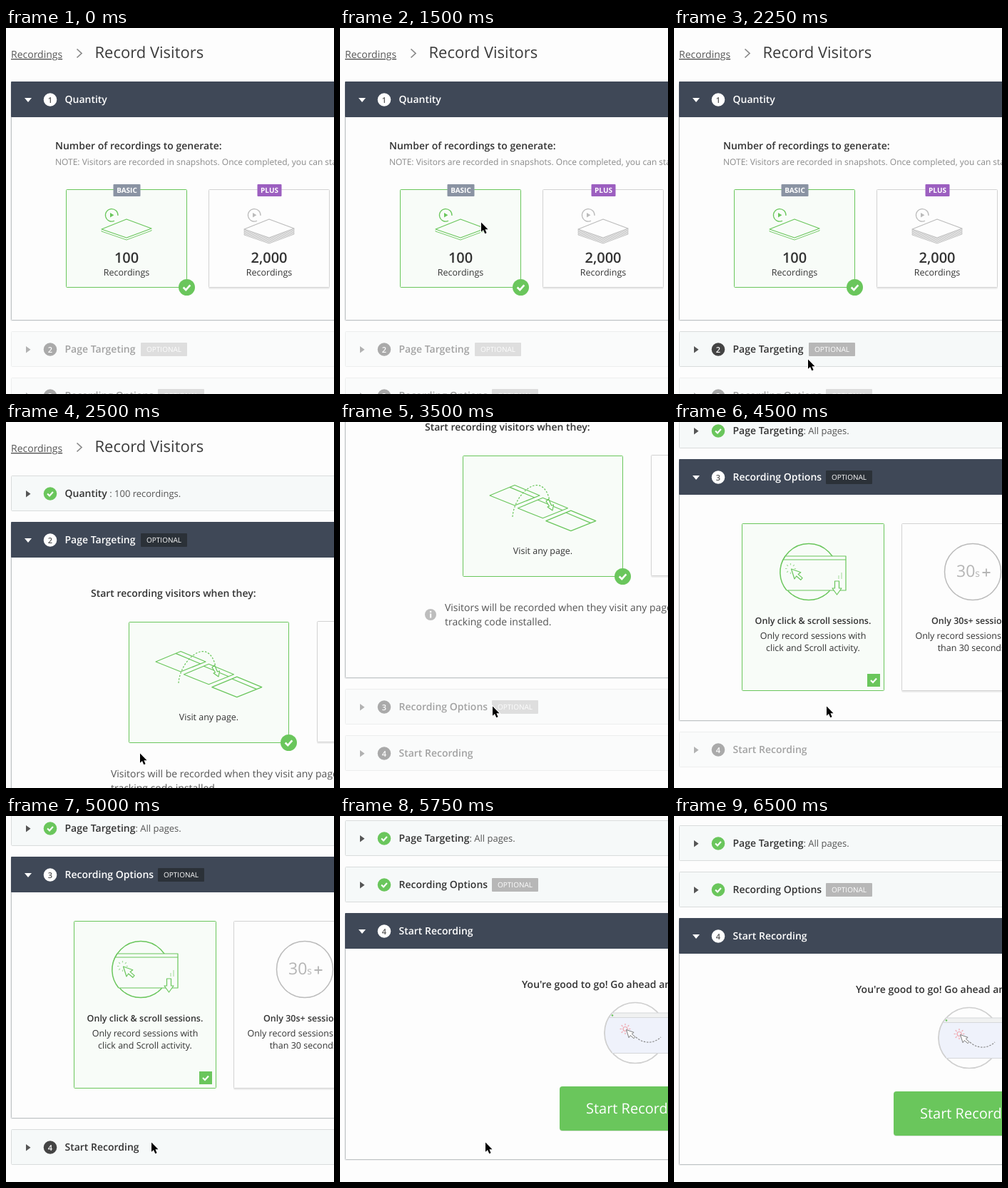
Recreate the animation shown at these times as an HTML page. Size 460 px wide and 513 px high, loop 7250 ms.

```html
<!DOCTYPE html>
<html lang="en">
<head>
<meta charset="utf-8">
<title>Record visitors</title>
<style>
  html, body { margin: 0; width: 100%; height: 100%; overflow: hidden; background: #fdfdfd; }
  svg { display: block; width: 460px; height: 513px; overflow: hidden; }
  text { font: 14px "Open Sans", "Noto Sans", sans-serif; fill: #555; text-rendering: geometricPrecision; }
  .bold { font-weight: 600; fill: #333; }
  .white { fill: #fff; }
  .small { font-size: 12.5px; fill: #333; }
  .mid { text-anchor: middle; }
  .tag { font-size: 10px; fill: #fff; }
  .num { font-size: 11px; font-weight: 600; text-anchor: middle; }
  .note { font-size: 13px; font-weight: 400; fill: #555; }
  .line { fill: none; stroke: currentColor; stroke-width: 1.2; stroke-linejoin: round; }
  .fill { fill: #fafdfa; }
  .green { color: #6ac65c; }
  .grey { color: #bbb; }

  .scene, .todo, #info, #cursor { animation: 7250ms step-end infinite; }
  .todo { opacity: .45; }
  #a { animation-name: a; }
  #b { animation-name: b; }
  #c { animation-name: c; }
  #d { animation-name: d; }
  #info { animation-name: info; }
  #cursor { animation-name: cursor; }
  .hover2 { animation-name: hover2; }
  .hover3 { animation-name: hover3; }
  .hover4 { animation-name: hover4; }

  @keyframes a { 0% { opacity: 1 } 34.482%, 100% { opacity: 0 } }
  @keyframes b {
    0% { opacity: 0; transform: none }
    34.482% { opacity: 1; transform: none }
    48.275% { opacity: 1; transform: translateY(-233px) }
    51.724% { opacity: 1; transform: translateY(-231px) }
    58.620%, 100% { opacity: 0; transform: none }
  }
  @keyframes c {
    0% { opacity: 0; transform: none }
    58.620% { opacity: 1; transform: translateY(5px) }
    62.068% { opacity: 1; transform: none }
    65.517% { opacity: 1; transform: translateY(4px) }
    68.965% { opacity: 1; transform: translateY(5px) }
    72.413%, 100% { opacity: 0; transform: none }
  }
  @keyframes d {
    0% { opacity: 0; transform: none }
    72.413% { opacity: 1; transform: translateY(7px) }
    79.310% { opacity: 1; transform: none }
    82.758% { opacity: 1; transform: translateY(6px) }
    86.206%, 100% { opacity: 1; transform: translateY(7px) }
  }
  @keyframes info { 0% { opacity: 0 } 37.931%, 100% { opacity: 1 } }
  @keyframes hover2 { 0% { opacity: .45 } 31.034%, 100% { opacity: 1 } }
  @keyframes hover3 { 0% { opacity: .45 } 55.172%, 100% { opacity: 1 } }
  @keyframes hover4 { 0% { opacity: .45 } 68.965%, 100% { opacity: 1 } }
  @keyframes cursor {
    0% { opacity: 0; transform: translate(304px, 184px) }
    10.344% { opacity: 1; transform: translate(304px, 184px) }
    13.793% { opacity: 1; transform: translate(240px, 220px) }
    17.241% { opacity: 1; transform: translate(198px, 267px) }
    20.689% { opacity: 1; transform: translate(196px, 271px) }
    27.586% { opacity: 1; transform: translate(191px, 437px) }
    31.034% { opacity: 1; transform: translate(186px, 463px) }
    41.379% { opacity: 1; transform: translate(208px, 401px) }
    44.827% { opacity: 1; transform: translate(212px, 397px) }
    65.517% { opacity: 1; transform: translate(209px, 425px) }
    68.965% { opacity: 1; transform: translate(202px, 456px) }
    82.758% { opacity: 1; transform: translate(212px, 455px) }
    86.206% { opacity: 1; transform: translate(230px, 451px) }
    89.655%, 100% { opacity: 0; transform: translate(230px, 451px) }
  }
</style>
</head>
<body>
<svg id="stage" viewBox="0 0 460 513"></svg>
<script>
const GREEN = '#6ac65c';

const text = (x, y, str, cls = '') => `<text x="${x}" y="${y}" class="${cls}">${str}</text>`;
const box = (x, y, w, h, fill, r = 0) =>
  `<rect x="${x}" y="${y}" width="${w}" height="${h}" rx="${r}" fill="${fill}"/>`;
const frame = (x, y, w, h, fill, stroke, r = 0) =>
  `<rect x="${x + .5}" y="${y + .5}" width="${w - 1}" height="${h - 1}" rx="${r}" fill="${fill}" stroke="${stroke}"/>`;
const dot = (x, y, r, fill) => `<circle cx="${x}" cy="${y}" r="${r}" fill="${fill}"/>`;
const line = (d, extra = '') => `<path class="line" d="${d}" ${extra}/>`;
const group = (cls, ...parts) => `<g class="${cls}">${parts.join('')}</g>`;
const scene = (id, ...parts) => `<g id="${id}" class="scene">${parts.join('')}</g>`;

const tick = (x, y, s) =>
  `<path d="M${x - 4 * s} ${y}l${3 * s} ${3 * s}l${5 * s} ${-5.6 * s}" fill="none" stroke="#fff" stroke-width="${2.2 * s}"/>`;
const check = (x, y, r) => dot(x, y, r, GREEN) + tick(x, y, r / 9.5);
const optional = (x, y, fill) => box(x, y + 16, 65, 19, fill, 1) + text(x + 8, y + 29, 'OPTIONAL', 'tag');

// Closed step: 50px high bar
const bar = (y, mark, title, badgeX) =>
  frame(7, y, 470, 50, '#f6f9f9', '#d9dcdc', 1) +
  `<path d="M28 ${y + 21}l6.5 4.8l-6.5 4.8z" fill="#555"/>` + mark +
  text(82.5, y + 30, title, 'bold') + (badgeX ? optional(badgeX, y, '#b7b7b7') : '');
const done = (y, title, badgeX) => bar(y, check(62, y + 25.5, 9.3), title, badgeX);
const todo = (y, n, title, badgeX, hover = '') => group('todo ' + hover,
  bar(y, dot(62, y + 25.5, 9.3, '#444') + text(62, y + 29.5, n, 'num white'), title, badgeX));

// Open step: dark header over a bordered panel
const panel = (y, end, n, title, badgeX) =>
  box(6, y + 3, 470, end - y - 1, '#eeeff0', 2) +
  frame(7, y, 470, end - y + 1, '#fdfdfd', '#bfc3c5', 1) +
  box(7, y, 470, 50, '#3f4857', 1) +
  `<path d="M26 ${y + 23}h10l-5 6z" fill="#fff"/>` +
  dot(62, y + 25.5, 9.3, '#fff') + text(62, y + 29.5, n, 'num') +
  text(82.5, y + 30, title, 'bold white') + (badgeX ? optional(badgeX, y, '#2b3138') : '');

const card = (x, y, w, h, on) =>
  (on ? '' : box(x, y + 2, w, h, '#ececec', 2)) +
  frame(x, y, w, h, on ? '#f8fcf8' : '#fdfdfd', on ? GREEN : '#d2d2d2', 1);

const crumbs = text(7, 42, 'Recordings').replace('<text', '<text text-decoration="underline"') +
  '<path d="M99.5 29.5l6.5 6l-6.5 6" fill="none" stroke="#888" stroke-width="1.7"/>' +
  `<text x="124.5" y="42" style="font-size:22px;fill:#3a3a3a">Record Visitors</text>`;

// Stack of sheets with a play button
const stack = (x, layers, color) => {
  let out = line(`M${x - 35} 282l35 -14l35 13l-35 13z`);
  for (let i = 1; i <= layers; i++) {
    const y = 282 + i * (layers > 1 ? 1.6 : 3);
    out += line(`M${x - 35} ${y - 1}v1l35 12l35 -13v-1`, 'style="stroke-width:.9"');
  }
  return group(color, out,
    line(`M${x - 17} 270.3a8.8 8.8 0 1 1 5 -7.3`),
    `<path d="M${x - 23} 259v6.6l5.4 -3.3z" fill="currentColor"/>`);
};
const plan = (x, layers, color, on, badge, badgeW, badgeFill, count) =>
  card(x, 226, 170, 138, on) +
  box(x + 85.5 - badgeW / 2, 219, badgeW, 17, badgeFill, 1) +
  `<text x="${x + 85.5}" y="231" class="tag mid" font-weight="700" style="font-weight:700">${badge}</text>` +
  stack(x + 85, layers, color) +
  `<text x="${x + 85}" y="328.5" class="bold mid" style="font-size:20px">${count}</text>` +
  text(x + 85, 347, 'Recordings', 'small mid');

const pages = () => {
  let out = '';
  for (let i = 0; i < 3; i++) {
    const x = 210 + i * 39.4, y = 336 + i * 17.8;
    out += line(`M${x} ${y}l35 -14.5l35 14.5l-35 14z M${x + 28} ${y - 11.6}l35 14.6`);
  }
  return group('green', out,
    line('M242 366C244 333 284 298 294 343', 'stroke-dasharray="2.5 2"'),
    line('M289 344l3.5 -3l4 9l3 -1l-1.5 8l-7 -5l2.5 -1z', 'style="fill:#f8fcf8"'));
};

const pointer = 'l4.5 14l2.7 -4l6 5.3l2.4 -2.7l-6 -5.2l3.7 -2.6z';
const rays = (x, y) => {
  let d = '';
  for (let i = 0; i < 8; i++) {
    const c = Math.cos(i * Math.PI / 4), s = Math.sin(i * Math.PI / 4);
    d += `M${x + 5 * c} ${y + 5 * s}L${x + 7.5 * c} ${y + 7.5 * s}`;
  }
  return d;
};

const clicks = group('green',
  '<circle class="line" cx="189" cy="210" r="39.5" style="stroke-width:1.5"/>',
  '<path d="M156 188H241V236H158A39.5 39.5 0 0 1 156 188z" fill="#f8fcf8"/>',
  line('M158 236A39.5 39.5 0 0 1 156 188', 'style="stroke-width:1.5"'),
  line('M156 188H241V236H158M153 193H241'),
  line(rays(163.5, 205.5), 'opacity=".6"'),
  line('M164.500 206' + pointer, 'style="fill:#f8fcf8"'),
  line('M231 220v-5M235 220v-9', 'opacity=".5"'),
  line('M225.500 223h6v10h3.500l-6.500 9l-6.500 -9h3.500z', 'style="fill:#f8fcf8"'));

const replay = group('grey',
  '<circle class="line" cx="414" cy="304" r="42.5" style="stroke:#cfcfcf;stroke-width:1.7"/>',
  '<path d="M381.500 276H470V332H381.500A43 43 0 0 1 381.500 276z" fill="#eff2fb"/>',
  box(381, 276, 90, 6, '#f0f1f1'),
  line('M382 276H470M378 282.500H470M382 332.500H470', 'style="stroke:#d5d7da"'),
  line('M381.500 332A42.500 42.500 0 0 1 381.500 276', 'style="stroke:#cfcfcf;stroke-width:1.7"'),
  dot(382, 279.500, 1.3, GREEN),
  line(rays(400, 298.500), 'style="stroke:#f0a5ac"'),
  '<circle class="line" cx="400" cy="298.500" r="3" style="stroke:#f0a5ac"/>',
  line('M415 310C425 319 439 320 450 310', 'style="stroke:#888" stroke-dasharray="2.500 1.700"'),
  `<path class="line" transform="translate(401.500 299.500) scale(.8)" d="M0 0${pointer}" style="fill:#fff;stroke:#777"/>`);

document.getElementById('stage').innerHTML =
  scene('a', crumbs, panel(75, 409, 1, 'Quantity'),
    text(69, 170, 'Number of recordings to generate:', 'bold'),
    '<text x="69" y="192" style="font-size:12px;fill:#8a8a8a">NOTE: Visitors are recorded in snapshots. Once completed, you can start</text>',
    plan(84, 1, 'green', true, 'BASIC', 38, '#8a93a3', '100'),
    plan(284, 5, 'grey', false, 'PLUS', 34, '#9c5fc0', '2,000'),
    check(253.5, 363.5, 11.5),
    todo(425, 2, 'Page Targeting', 189, 'hover2'),
    todo(490, 3, 'Recording Options', 213)) +

  scene('b', crumbs,
    done(75, 'Quantity<tspan class="note"> : 100 recordings.</tspan>'),
    panel(140, 591, 2, 'Page Targeting', 189),
    text(119, 245, 'Start recording visitors when they:', 'bold'),
    card(172, 280, 225, 170, true), card(436, 279, 225, 170, false),
    pages(), text(284.5, 418, 'Visit any page.', 'small mid'),
    check(396.5, 449.5, 11.5),
    `<g id="info">${dot(127, 503, 8, '#bdbdbd')}${box(126, 501.5, 2.2, 6, '#fff')}${dot(127.1, 499, 1.3, '#fff')}</g>`,
    text(147, 498, 'Visitors will be recorded when they visit any page with'),
    text(147, 518, 'tracking code installed.'),
    todo(607, 3, 'Recording Options', 213, 'hover3'),
    todo(672, 4, 'Start Recording')) +

  scene('c',
    done(-13, 'Page Targeting<tspan class="note">: All pages.</tspan>'),
    panel(52, 418, 3, 'Recording Options', 213),
    card(95, 142, 200, 235, true), card(319, 142, 200, 235, false),
    clicks,
    '<text x="195" y="283" class="small bold mid">Only click &amp; scroll sessions.</text>',
    text(195, 304, 'Only record sessions with', 'small mid'),
    text(195, 321, 'click and Scroll activity.', 'small mid'),
    box(271, 353, 18, 18, GREEN), tick(280, 362, 1),
    '<circle class="line" cx="419" cy="210" r="39.5" style="stroke:#bbb;stroke-width:1.5"/>',
    '<text x="396" y="217" style="font-size:23px;fill:#b5b5b5">30<tspan style="font-size:14px">s</tspan></text>',
    '<path d="M432.500 211h11M438 205.500v11" stroke="#b5b5b5" stroke-width="1.8"/>',
    text(419, 283, 'Only 30s+ sessions.', 'small bold mid'),
    text(419, 304, 'Only record sessions longer', 'small mid'),
    text(419, 321, 'than 30 seconds.', 'small mid'),
    todo(434, 4, 'Start Recording', 0, 'hover4')) +

  scene('d',
    done(6, 'Page Targeting<tspan class="note">: All pages.</tspan>'),
    done(71, 'Recording Options', 213),
    panel(136, 481, 4, 'Start Recording'),
    text(255, 241, "You're good to go! Go ahead and start", 'bold'),
    replay,
    box(308, 381, 240, 61, '#dfe6de', 4), box(308, 379, 240, 62, GREEN, 4),
    '<text x="345" y="417" class="white" style="font-size:20px">Start Recording</text>') +

  `<g id="cursor"><path d="M2 1.500V14.800L5 12L7.300 17.300L9.600 16.300L7.400 11.200H11.500Z"
    stroke="#fff" stroke-width="1.800" paint-order="stroke"/></g>`;
</script>
</body>
</html>
```
